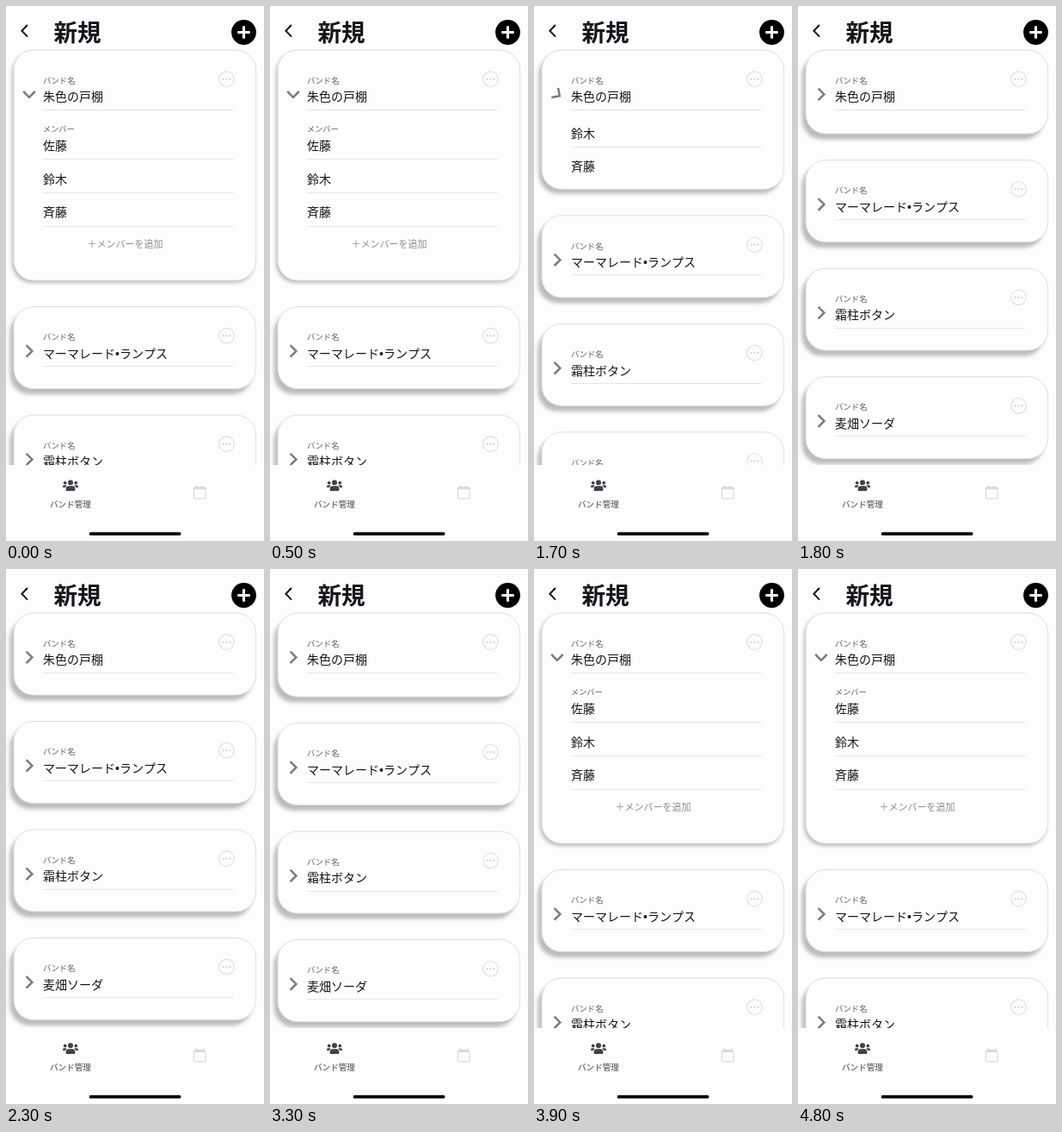
Write an HTML page with a canvas that moves like this. It is 300 px wide and 620 px high and loops after 4.9 s.

```html
<!DOCTYPE html>
<html lang="ja">
<head>
<meta charset="utf-8">
<title>バンド管理</title>
<style>
html, body { margin: 0; width: 100%; height: 100%; overflow: hidden; background: #fdfdfe; }
canvas { display: block; width: 300px; height: 620px; }
</style>
</head>
<body>
<canvas id="stage"></canvas>
<script>
const W = 300, H = 620, LOOP = 4900, STEP = 100;
const BG = '#fdfdfe', INK = '#17151a', SOFT = '#625f63', ARROW = '#7f7a7d';
const PALE = '#dfdde0', RULE = '#e6e5e8', DARK = '#443f47';
const FONT = '"Liberation Sans", "Noto Sans CJK JP", "Noto Sans CJK", sans-serif';
const BANDS = ['朱色の戸棚', 'マーマレード•ランプス', '霜柱ボタン', '麦畑ソーダ'];
const MEMBERS = ['佐藤', '鈴木', '斉藤'];
const TOP = 51, PITCH = 125.5, CARD_H = 95, BODY_H = 172, BODY_Y = 128;
const CLOSE_AT = 1616, OPEN_AT = 3284, DURATION = 200;

const canvas = document.getElementById('stage');
const ctx = canvas.getContext('2d');
const dpr = window.devicePixelRatio || 1;
canvas.width = W * dpr;
canvas.height = H * dpr;

const clamp = v => Math.min(1, Math.max(0, v));
const mix = (a, b, k) => a + (b - a) * k;
const easeIn = k => Math.pow(k, 1.75);

// 1 = expanded, 0 = collapsed; collapsing runs the same curve backwards
function expansion(t) {
  if (t < OPEN_AT) return easeIn(1 - clamp((t - CLOSE_AT) / DURATION));
  return easeIn(clamp((t - OPEN_AT) / DURATION));
}

// y is the vertical middle of the glyphs
function label(str, x, y, size, color, weight = 400) {
  ctx.font = `${weight} ${size}px ${FONT}`;
  ctx.fillStyle = color;
  ctx.fillText(str, x, y + size * 0.38);
}

function stroke(points, color, width) {
  ctx.beginPath();
  points.forEach(([x, y]) => ctx.lineTo(x, y));
  ctx.strokeStyle = color;
  ctx.lineWidth = width;
  ctx.stroke();
}

function disc(x, y, r, color) {
  ctx.beginPath();
  ctx.arc(x, y, r, 0, Math.PI * 2);
  ctx.fillStyle = color;
  ctx.fill();
}

function rounded(x, y, w, h, r, color) {
  ctx.beginPath();
  ctx.roundRect(x, y, w, h, r);
  ctx.fillStyle = color;
  ctx.fill();
}

const rule = y => stroke([[43, y], [265, y]], RULE, 1);

function panel(y, h, open) {
  ctx.save();
  ctx.shadowColor = 'rgba(140, 132, 136, 0.55)';
  ctx.shadowBlur = 4.5 * dpr;
  ctx.shadowOffsetX = mix(-4.5, -2, open) * dpr;
  ctx.shadowOffsetY = mix(6.5, 3, open) * dpr;
  rounded(9, y, 281.5, h, 23, BG);
  ctx.restore();
  ctx.strokeStyle = PALE;
  ctx.lineWidth = 1;
  ctx.stroke();
}

function chevron(y, open) {
  ctx.save();
  ctx.translate(27, y);
  ctx.rotate((open - 1) * Math.PI / 2);
  stroke([[-6.8, -3.4], [0, 3.4], [6.8, -3.4]], ARROW, 2.5);
  ctx.restore();
}

function moreButton(x, y) {
  ctx.beginPath();
  ctx.arc(x, y, 8.8, 0, Math.PI * 2);
  ctx.strokeStyle = PALE;
  ctx.lineWidth = 1.1;
  ctx.stroke();
  for (const d of [-4, 0, 4]) disc(x + d, y, 1, '#c9c6cc');
}

function members(open) {
  const h = BODY_H * open;
  if (h <= 0) return;
  ctx.save();
  ctx.beginPath();
  ctx.rect(9, BODY_Y, 281, h);
  ctx.clip();
  ctx.translate(0, (h - BODY_H) / 2);
  label('メンバー', 43, 143, 9.2, SOFT);
  MEMBERS.forEach((name, i) => {
    label(name, 43, 162 + i * 38.4, 14, INK);
    rule(177.5 + i * 39);
  });
  label('＋メンバーを追加', 94.5, 275.5, 11, '#8f8b8e');
  ctx.restore();
}

function card(name, y, open) {
  panel(y, CARD_H + BODY_H * open, open);
  label('バンド名', 43, y + 35.3, 9.4, SOFT);
  label(name, 43, y + 54, 14, INK);
  rule(Math.floor(y + 69) + 0.5);
  chevron(y + 51.4, open);
  moreButton(256.5, y + 33.7);
}

function header() {
  stroke([[25, 22], [18.4, 28.8], [25, 35.6]], INK, 2);
  label('新規', 55.5, 30.5, 27.6, INK, 700);
  disc(276.5, 30.5, 14.4, '#000');
  stroke([[269.3, 30.5], [283.7, 30.5]], '#fff', 3);
  stroke([[276.5, 23.3], [276.5, 37.7]], '#fff', 3);
}

function groupIcon(x, y) {
  ctx.save();
  ctx.translate(x, y);
  for (const side of [-1, 1]) {
    disc(side * 6.3, -3.6, 1.9, DARK);
    rounded(side * 6.3 - 2.7, -0.9, 5.4, 2.8, [1.8, 1.8, 0.4, 0.4], DARK);
  }
  disc(0, -4, 3.7, BG);
  rounded(-6, -0.9, 12, 7.5, 3.6, BG);
  disc(0, -4, 3, DARK);
  rounded(-5.3, 0, 10.6, 5.7, [3.2, 3.2, 0.9, 0.9], DARK);
  ctx.restore();
}

function calendarIcon(x, y, color) {
  ctx.beginPath();
  ctx.roundRect(x, y, 13.5, 13.5, 1.5);
  ctx.strokeStyle = color;
  ctx.lineWidth = 1.1;
  ctx.stroke();
  stroke([[x, y + 1.6], [x + 13.5, y + 1.6]], color, 1.8);
  for (const d of [2.8, 10.7]) stroke([[x + d, y - 2], [x + d, y + 0.5]], color, 1.3);
}

function navBar() {
  ctx.fillStyle = BG;
  ctx.fillRect(0, 532, W, H - 532);
  groupIcon(75, 556.2);
  label('バンド管理', 51, 577.3, 9.6, DARK);
  calendarIcon(218.5, 557.5, '#d8d6dc');
  rounded(96.7, 609.8, 106.8, 3.8, 1.9, '#000');
}

function draw(t) {
  const open = expansion(t);
  ctx.setTransform(dpr, 0, 0, dpr, 0, 0);
  ctx.fillStyle = BG;
  ctx.fillRect(0, 0, W, H);
  BANDS.forEach((name, i) => {
    card(name, TOP + PITCH * i + (i ? BODY_H * open : 0), i ? 0 : open);
  });
  members(open);
  header();
  navBar();
}

const start = performance.now();
function tick() {
  const t = (performance.now() - start) % LOOP;
  draw(Math.floor(t / STEP) * STEP);
  requestAnimationFrame(tick);
}
tick();
</script>
</body>
</html>
```
